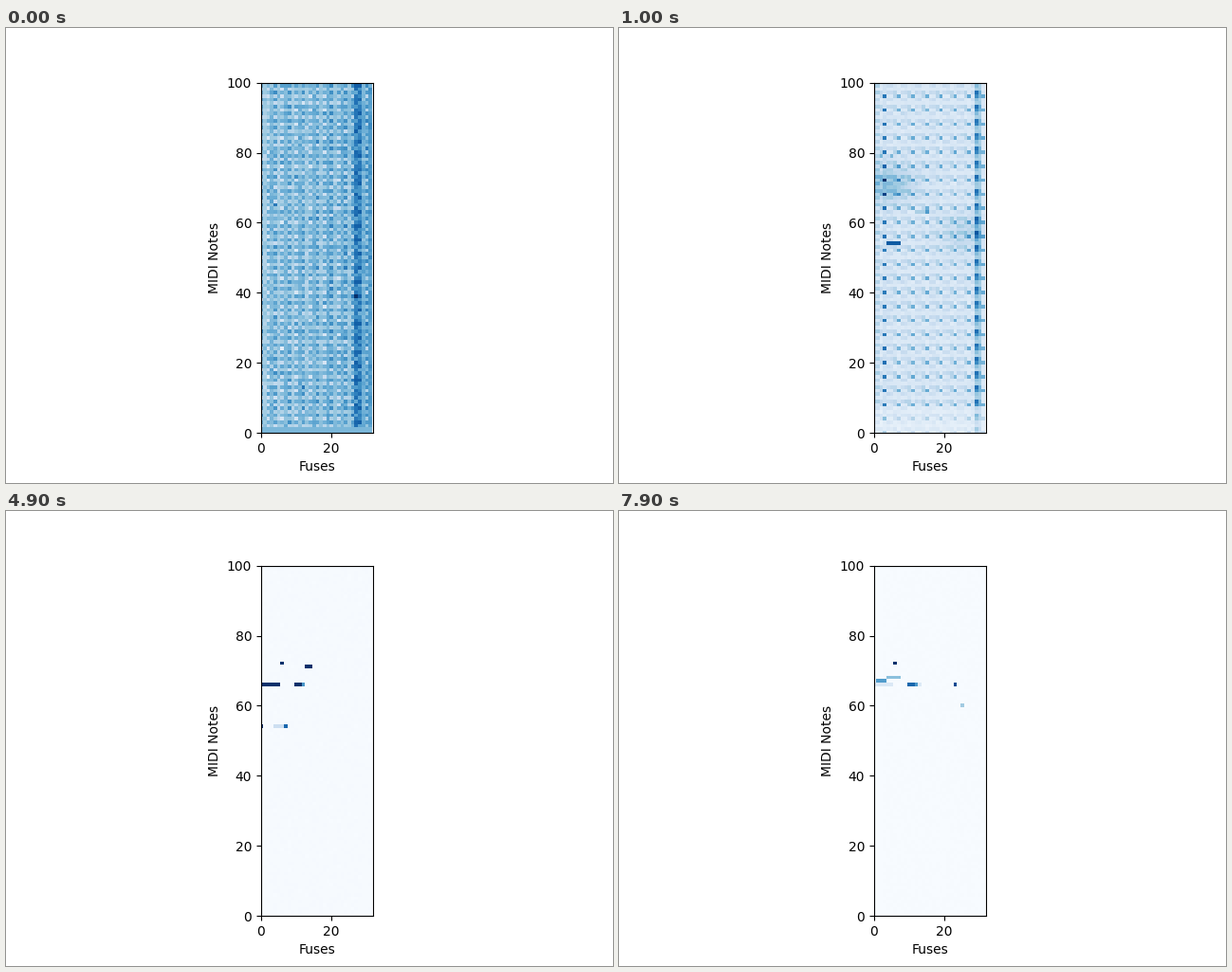
A matplotlib script that plays this animation: 640x480 px, repeating every 8 s.

```python
import numpy as np
import matplotlib.pyplot as plt
from matplotlib.animation import FuncAnimation

ROWS, COLS = 101, 32
FRAMES, STEP = 80, 100
LATTICE, SPARSE = 5, 19   # frames where the lattice peaks and has gone
RAMP = 14                 # frames a note takes to rise or fade
HOLD = 2 * FRAMES         # release time of notes that stay

rng = np.random.default_rng(7)
row, col = np.mgrid[:ROWS, :COLS]
grain = rng.uniform(0.4, 1, (ROWS, COLS)) * np.where(col < 3, 0.5, 1)


def blob(r, c, height, width):
    return np.exp(-((row - r) / height) ** 2 - ((col - c) / width) ** 2)


def weave_field():
    """Untrained output: a woven texture, darker towards the right."""
    v = 0.4 + 0.002 * col + 0.08 * (col > 25)
    v -= 0.06 * np.cos(np.pi * row) * (1 + np.cos(np.pi * col))
    v -= 0.06 * np.cos(np.pi * (col - 5.5) / 2)
    v += 0.05 * np.cos(np.pi * row / 2) * np.cos(np.pi * col / 2)
    v += rng.normal(0, 0.045, v.shape)
    v += 0.16 * ((col == 27) | (col == 28)) * (row % 4 != 1)
    v = np.where(row < 2, 0.46, v).clip(0.08, 0.82)
    v[39, 27] = 1
    return v


def lattice_field():
    """Early training: dots every four cells and two soft clouds."""
    r, c = row % 4, col % 4
    v = 0.11 + 0.36 * ((r == 0) & (c == 3))
    v += 0.14 * ((r < 2) & (c == 2)) + 0.1 * ((r == 1) & (c < 2))
    v += 0.08 * ((r == 3) & (c < 2))
    v *= 1 + 0.5 * (col == 3) + 0.5 * (col < 2)
    v += (0.2 + 0.32 * (r < 2)) * (col == 29) + 0.2 * (col == 30)
    v += 0.25 * blob(71, 4, 5, 7) + 0.14 * blob(57, 26, 5, 6)
    v += rng.normal(0, 0.012, v.shape)
    v *= np.where(row < 8, 0.4 + 0.04 * row, 1)
    v = v.clip(0, 0.95)
    v[72, 3] = 1
    return v


# row, first column, last column, level, onset, release
NOTES = [
    (79, 2, 2, 0.55, 5, 33), (79, 5, 5, 0.55, 5, 33),
    (72, 6, 6, 1, 31, HOLD),
    (71, 13, 14, 1, 26, 63),
    (69, 0, 0, 0.7, 19, 47),
    (68, 6, 7, 0.65, 5, 47), (68, 4, 5, 0.42, 19, 47),
    (68, 4, 7, 0.42, 55, HOLD),
    (67, 2, 3, 0.3, 5, 47), (67, 1, 3, 0.62, 66, HOLD),
    (66, 0, 5, 1, 19, 81), (66, 10, 11, 1, 19, 90),
    (66, 12, 12, 0.6, 27, HOLD), (66, 13, 13, 0.45, 55, 83),
    (66, 23, 23, 0.9, 59, HOLD),
    (63, 12, 14, 0.4, 5, 33), (63, 15, 15, 0.7, 5, 33),
    (60, 25, 25, 0.36, 65, HOLD),
    (54, 4, 6, 1, 5, 52), (54, 7, 7, 1, 5, 60), (54, 0, 0, 1, 35, 76),
]

weave, lattice = weave_field(), lattice_field()


def ramp(x):
    return np.clip(x, 0, 1)


def field_at(n):
    if n < LATTICE:
        t = n / LATTICE
        v = (1 - t) * weave + t * lattice
    else:
        fade = ramp((SPARSE - n) / (SPARSE - LATTICE)) ** 2
        v = fade * lattice + (1 - fade) * grain * 0.45 / n
    for r, first, last, level, on, off in NOTES:
        gain = level * ramp((n - on) / RAMP) * ramp((off - n) / RAMP)
        cells = v[r, first:last + 1]
        np.maximum(cells, gain, out=cells)
    return v / v.max()


fig, ax = plt.subplots(figsize=(6.4, 4.8), dpi=100)
image = ax.imshow(field_at(0), cmap="Blues", vmin=0, vmax=1,
                  origin="lower", interpolation="nearest")
ax.set(xlim=(0, COLS), ylim=(0, 100), xlabel="Fuses", ylabel="MIDI Notes")


def update(n):
    image.set_data(field_at(n))
    return [image]


anim = FuncAnimation(fig, update, frames=FRAMES, interval=STEP,
                     repeat=True, repeat_delay=0)
plt.show()
```
